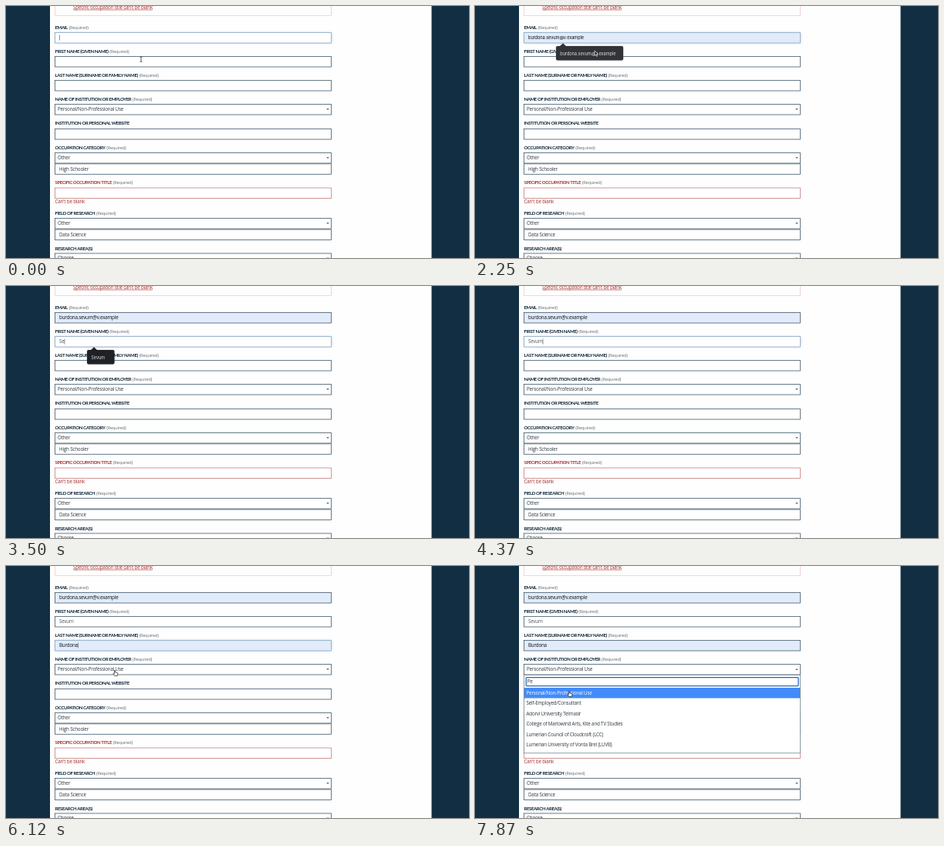
An HTML page with a canvas that plays this animation: 600x327 px, repeating every 8 s.

```html
<!DOCTYPE html>
<html lang="en">
<head>
<meta charset="utf-8">
<title>Form</title>
<style>
  html, body { margin: 0; width: 100%; height: 100%; overflow: hidden; background: #112e43; }
  canvas { display: block; width: 600px; height: 327px; }
</style>
</head>
<body>
<canvas id="stage"></canvas>
<script>
const LOOP = 8000;
const NAVY = '#112e43', EDGE = '#4d6271', TEXT = '#30383f', RED = '#a1302e', FILLED = '#e1ebfa';
const BODY = { font: '6.25px "Open Sans", sans-serif', gap: -0.19 };
const NOTE = { font: '5.6px "Open Sans", sans-serif', gap: -0.17 };
const LABEL = { font: '700 6.05px Lato, sans-serif', gap: -0.4 };
const SYSTEM = { font: '5.6px Inter, sans-serif', gap: -0.05 };
const LEFT = 63.5, WIDTH = 358;

const EMAIL = 'burdona.sevum@v.example', FIRST = 'Sevum', LAST = 'Burdona';
const OPTIONS = [
  'Personal/Non-Professional Use',
  'Self-Employed/Consultant',
  'Adorvi University Telmasir',
  'College of Marlowind Arts, Kite and TV Studies',
  'Lumerian Council of Cloudcraft (LCC)',
  'Lumerian University of Vonta Brel (LUVB)'
];

// Typed text, suggestion popup, preview and acceptance, in ms
const inputs = [
  { y: 34, full: EMAIL, keys: [250, 950], focus: [0, 2950], tip: [700, 2500], preview: 1900, accept: 2500 },
  { y: 65, full: FIRST, keys: [3250, 3400, 3640, 3770, 3880], focus: [2950, 4400], tip: [3400, 3980] },
  { y: 96, full: LAST, keys: [4900, 5040], focus: [4400, 6500], tip: [5040, 5850], preview: 5550, accept: 5850 }
];
const OPEN_AT = 6500;
const searchKeys = [7250, 7700];

// Pointer stops: time, x, y, shape until the next stop
const pointer = [
  [0, 175, 69, 'beam'], [250, 175, 69, ''],
  [1550, 173, 76, 'arrow'], [1900, 155, 58, 'arrow'], [2500, 155, 58, 'arrow'],
  [2650, 161, 64, 'beam'], [2900, 175, 72, 'beam'], [3250, 175, 72, ''],
  [5250, 150, 138, 'arrow'], [5550, 122, 121, 'arrow'], [5850, 122, 121, 'arrow'],
  [5950, 132, 131, 'hand'], [6090, 142, 139, 'hand'], [6600, 142, 139, 'hand'],
  [7050, 123, 166, 'hand'], [LOOP, 123, 166, 'hand']
];

const canvas = document.getElementById('stage');
const ratio = window.devicePixelRatio || 1;
canvas.width = Math.round(600 * ratio);
canvas.height = Math.round(327 * ratio);
const c = canvas.getContext('2d');

function rect(x, y, w, h, color) {
  c.fillStyle = color;
  c.fillRect(x, y, w, h);
}

function measure(str, style) {
  c.font = style.font;
  c.letterSpacing = style.gap + 'px';
  return c.measureText(str).width;
}

function text(str, x, middle, color, style = BODY) {
  const w = measure(str, style);
  c.fillStyle = color;
  c.fillText(str, x, middle + 2.1);
  return w;
}

function shape(points, fill, stroke, width = 0.7) {
  c.beginPath();
  points.forEach(([x, y]) => c.lineTo(x, y));
  c.closePath();
  c.fillStyle = fill;
  c.fill();
  if (!stroke) return;
  c.strokeStyle = stroke;
  c.lineWidth = width;
  c.lineJoin = 'round';
  c.stroke();
}

function box(y, border = EDGE, fill = '#fff') {
  rect(LEFT, y + 0.5, WIDTH, 13.5, fill);
  c.strokeStyle = border;
  c.lineWidth = 0.85;
  c.strokeRect(LEFT, y + 0.5, WIDTH, 13.5);
}

function label(str, middle, required = true, color = '#0a2235') {
  const w = text(str, LEFT, middle, color, LABEL);
  if (required) text('(Required)', LEFT + w + 1.7, middle, '#666b70', NOTE);
}

function select(y, value, open = false) {
  box(y);
  text(value, 67, y + 6.7, TEXT);
  const s = open ? -1 : 1, m = y + 7;
  shape([[415.2, m - s], [418.8, m - s], [417, m + 1.3 * s]], '#657580');
}

function typed(str, keys, t) {
  return str.slice(0, keys.filter(k => t >= k).length);
}

function input(f, t) {
  const focused = t >= f.focus[0] && t < f.focus[1];
  const accepted = t >= f.accept;
  const preview = !accepted && t >= f.preview;
  const filled = preview || accepted;
  const value = filled ? f.full : typed(f.full, f.keys, t);
  if (focused) {
    c.save();
    c.shadowColor = 'rgba(80, 145, 205, .7)';
    c.shadowBlur = 3.5 * ratio;
    rect(LEFT, f.y + 0.5, WIDTH, 13.5, '#fff');
    c.restore();
  }
  box(f.y, focused ? '#8fabc4' : EDGE, filled ? FILLED : '#fff');
  const w = text(value, 69, f.y + 7, filled ? '#0b0e11' : '#50565c', preview ? SYSTEM : BODY);
  if (focused && !preview) rect(69 + w, f.y + 3.6, 0.7, 7, '#5a6066');
}

function popup(f, t) {
  if (t < f.tip[0] || t >= f.tip[1]) return;
  const y = f.y + 18;
  const color = t >= f.preview ? '#313337' : '#1f2124';
  const w = Math.max(35.5, measure(f.full, SYSTEM) + 15);
  c.save();
  c.shadowColor = 'rgba(0, 0, 0, .3)';
  c.shadowBlur = 2 * ratio;
  c.beginPath();
  c.roundRect(105, y, w, 18.6, 2);
  c.fillStyle = color;
  c.fill();
  c.restore();
  shape([[109.8, y + 0.2], [114, y - 3.8], [118.2, y + 0.2]], color);
  text(f.full, 110.3, y + 9.4, '#dcdddf', SYSTEM);
}

function dropdown(t) {
  rect(LEFT, 141.5, WIDTH, 101.3, '#fff');
  c.strokeStyle = '#75858f';
  c.lineWidth = 0.8;
  c.strokeRect(LEFT, 141.5, WIDTH, 101.3);
  c.beginPath();
  c.roundRect(66.2, 144.6, 352.8, 11, 1);
  c.strokeStyle = '#2566c4';
  c.lineWidth = 1.3;
  c.stroke();
  const query = typed('Pe', searchKeys, t);
  text(query, 67.7, 150, TEXT);
  if (!query) rect(67.7, 147, 0.6, 6, '#454a50');
  rect(64, 158, 357, 13.5, '#428bf9');
  OPTIONS.forEach((name, i) => text(name, 66.5, 164.7 + 13.5 * i, i ? TEXT : '#fff'));
}

function drawPointer(t) {
  const i = pointer.findIndex((p, n) => t >= p[0] && t < pointer[n + 1][0]);
  const [t0, x0, y0, kind] = pointer[i];
  if (!kind) return;
  const [t1, x1, y1] = pointer[i + 1];
  const u = (t - t0) / (t1 - t0), e = u * u * (3 - 2 * u);
  c.save();
  c.translate(x0 + (x1 - x0) * e, y0 + (y1 - y0) * e);
  if (kind === 'beam') {
    rect(-0.4, -2.8, 0.8, 6, '#333');
    rect(-1.6, -3.2, 3.2, 0.7, '#333');
    rect(-1.6, 2.8, 3.2, 0.7, '#333');
  } else if (kind === 'arrow') {
    shape([[0, 0], [0, 6.2], [1.5, 5], [2.5, 7.3], [3.5, 6.8], [2.6, 4.6], [4.5, 4.5]], '#111', '#fff');
  } else {
    shape([[-1.6, -3.4], [-0.5, -3.4], [-0.4, -1], [2.5, -0.4], [2.9, 0.3], [2.3, 3.6],
      [-1.1, 3.6], [-3.1, 0.7], [-2.6, 0.1], [-1.6, 0.9]], '#fff', '#222');
  }
  c.restore();
}

function draw(t) {
  const open = t >= OPEN_AT;
  c.setTransform(ratio, 0, 0, ratio, 0, 0);
  rect(0, 0, 600, 327, NAVY);
  rect(57, 0, 494.5, 327, '#fefefe');

  c.strokeStyle = '#edcccc';
  c.lineWidth = 0.8;
  c.strokeRect(LEFT, -10, WIDTH, 22.5);
  const w = text("Specific occupation title can't be blank", 87, 1.8, RED);
  rect(87, 4.7, w, 0.6, RED);

  label('EMAIL', 27.4);
  label('FIRST NAME (GIVEN NAME)', 58.6);
  label('LAST NAME (SURNAME OR FAMILY NAME)', 89.8);
  label('NAME OF INSTITUTION OR EMPLOYER', 121.1);
  label('INSTITUTION OR PERSONAL WEBSITE', 152.3, false);
  label('OCCUPATION CATEGORY', 183.6);
  label('SPECIFIC OCCUPATION TITLE', 229.3, true, RED);
  label('FIELD OF RESEARCH', 268.8);
  label('RESEARCH AREA(S)', 314.4, false);

  select(127, OPTIONS[0], open);
  box(159);
  select(190, 'Other');
  box(204.3);
  text('High Schooler', 69, 211.5, TEXT);
  box(235.5, '#c88583');
  text("Can't be blank", LEFT, 254.2, RED);
  select(275, 'Other');
  box(289.5);
  text('Data Science', 69, 296.8, TEXT);
  select(320.5, 'Choose');

  inputs.forEach(f => input(f, t));
  if (open) dropdown(t);
  inputs.forEach(f => popup(f, t));
  drawPointer(t);
}

const start = performance.now();
function tick() {
  draw((performance.now() - start) % LOOP);
  requestAnimationFrame(tick);
}
tick();
</script>
</body>
</html>
```
